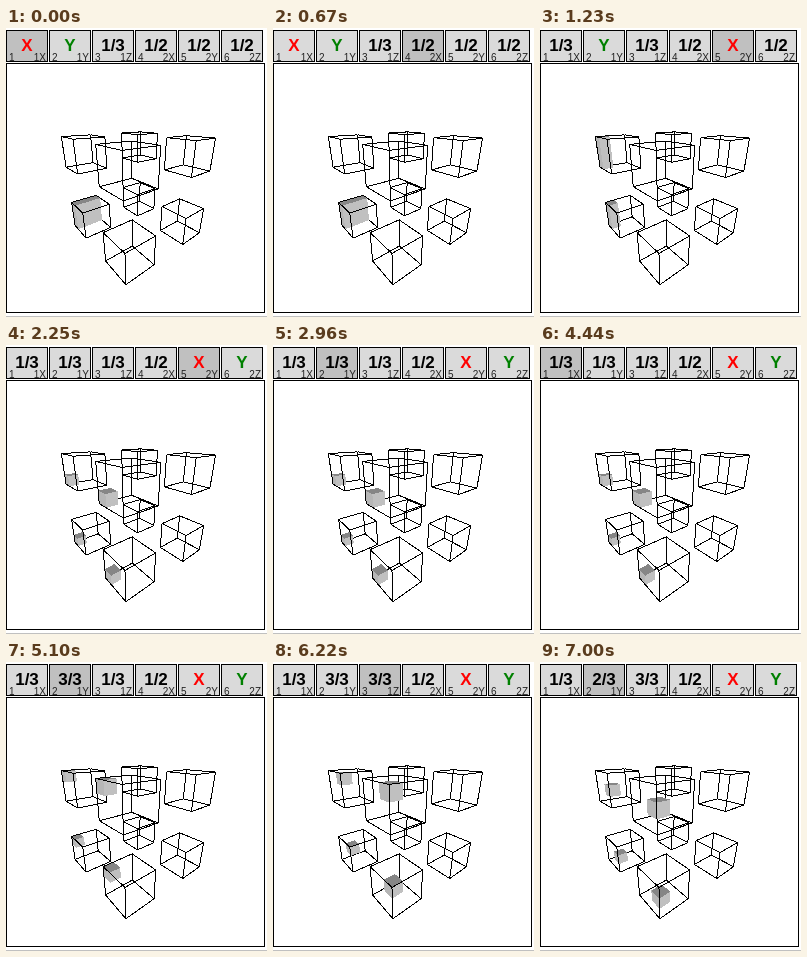
An HTML page for the animation above (7140 ms loop, 261 px wide and 289 px high).

```html
<!DOCTYPE html>
<html lang="en">
<head>
<meta charset="utf-8">
<title>Six-axis cube selector</title>
<style>
  html, body { margin: 0; width: 100%; height: 100%; overflow: hidden; background: #fff; }
  svg { display: block; position: absolute; left: 0; top: 0; }
  text { font-family: Arial, "Liberation Sans", sans-serif; }
  .cell rect { fill: #dadada; stroke: #000; }
  .cell.on rect { fill: #c0c0c0; }
  .value { font-size: 17px; font-weight: bold; text-anchor: middle; }
  .small { font-size: 10px; fill: #222; }
  .end { text-anchor: end; }
  .crisp { shape-rendering: crispEdges; }
  .wire { fill: none; stroke: #000; stroke-width: 1; }
</style>
</head>
<body>
<svg id="stage" width="261" height="289" viewBox="0 0 261 289">
  <rect class="crisp wire" x="0.5" y="35.5" width="258" height="249"/>
  <rect class="crisp" y="288" width="261" height="1" fill="#c0c0c0"/>
  <g id="cells"></g>
  <g id="scene" class="crisp"></g>
</svg>
<script>
const LOOP = 7140;
const LABELS = ['1X', '1Y', '1Z', '2X', '2Y', '2Z'];
const SIZES = [3, 3, 3, 2, 2, 2];
const START = ['X', 'Y', 1, 1, 1, 1];
const INK = { X: '#f00', Y: '#008000' };

// Each step: time, then either a cell to select or axis values to set
const STEPS = [
  [110, 1], [390, 2], [670, 3], [950, 4],
  [1230, { 0: 1, 4: 'X' }],
  [1510, 5],
  [1920, { 1: 1, 5: 'Y' }],
  [2250, 4], [2490, 3], [2680, 2], [2960, 1], [3180, 0],
  [3510, { 0: 2 }], [3790, { 0: 3 }], [4120, { 0: 2 }], [4440, { 0: 1 }],
  [4630, 1],
  [4820, { 1: 2 }], [5100, { 1: 3 }],
  [5750, 2],
  [5930, { 2: 2 }], [6220, { 2: 3 }],
  [6680, 1],
  [7000, { 1: 2 }]
];

const NS = 'http://www.w3.org/2000/svg';
const byId = id => document.getElementById(id);

function add(parent, tag, attrs, text = '') {
  const el = document.createElementNS(NS, tag);
  for (const key in attrs) el.setAttribute(key, attrs[key]);
  el.textContent = text;
  parent.appendChild(el);
  return el;
}

// Perspective camera aimed at the middle of the eight cubes
const YAW = 39.3 * Math.PI / 180, PITCH = 22 * Math.PI / 180;
const DIST = 5, FOCAL = 171, CX = 129.2, CY = 160;
const HALF = 0.428;

function toCamera([x, y, z]) {
  const w = z * Math.cos(YAW) - x * Math.sin(YAW);
  return {
    u: x * Math.cos(YAW) + z * Math.sin(YAW),
    up: y * Math.cos(PITCH) - w * Math.sin(PITCH),
    near: w * Math.cos(PITCH) + y * Math.sin(PITCH)
  };
}

function project(point) {
  const { u, up, near } = toCamera(point);
  const k = FOCAL / (DIST - near);
  return (CX + u * k).toFixed(2) + ' ' + (CY - up * k).toFixed(2);
}

// Corner bits: 1 = x, 2 = y, 4 = z
function corners(lo, hi) {
  return Array.from({ length: 8 }, (_, i) =>
    project([0, 1, 2].map(a => (i >> a & 1 ? hi : lo)[a])));
}

const center = cube => cube.map(bit => 2 * bit - 1);
const depth = cube => toCamera(center(cube)).near;

// Far cubes come first, so nearer ones paint over them
const cubes = Array.from({ length: 8 }, (_, i) => [0, 1, 2].map(a => i >> a & 1))
  .sort((a, b) => depth(a) - depth(b));

function bounds(cube, ranges) {
  const at = side => center(cube).map((c, a) =>
    c + HALF * (2 * ranges[a][side] / 3 - 1));
  return corners(at(0), at(1));
}

const BACK = 1; // the corner farthest from the camera
const FACES = [
  [[0, 2, 6, 4], '#b6b6b6'],
  [[4, 5, 7, 6], '#c0c0c0'],
  [[2, 3, 7, 6], '#868686']
];

function addEdges(parent, p, behind) {
  let d = '';
  for (let i = 0; i < 8; i++)
    for (const bit of [1, 2, 4]) {
      const j = i | bit;
      if (j !== i && (i === BACK || j === BACK) === behind) d += `M${p[i]}L${p[j]}`;
    }
  add(parent, 'path', { class: 'wire', d });
}

const free = v => typeof v === 'string';

function drawScene(values) {
  const scene = byId('scene');
  scene.textContent = '';
  const full = [[0, 3], [0, 3], [0, 3]];
  const ranges = values.slice(0, 3).map(v => free(v) ? [0, 3] : [v - 1, v]);
  for (const cube of cubes) {
    const frame = bounds(cube, full);
    addEdges(scene, frame, true);
    if (cube.every((bit, a) => free(values[a + 3]) || values[a + 3] === bit + 1)) {
      const p = bounds(cube, ranges);
      for (const [ids, fill] of FACES)
        add(scene, 'path', { d: 'M' + ids.map(i => p[i]).join('L') + 'Z', fill });
    }
    addEdges(scene, frame, false);
  }
}

const cells = LABELS.map((label, i) => {
  const g = add(byId('cells'), 'g', { transform: `translate(${43 * i} 0)` });
  add(g, 'rect', { class: 'crisp', x: 0.5, y: 2.5, width: 41, height: 31 });
  const value = add(g, 'text', { class: 'value', x: 21, y: 23 });
  add(g, 'text', { class: 'small', x: 3, y: 33 }, i + 1);
  add(g, 'text', { class: 'small end', x: 40, y: 33 }, label);
  return { g, value };
});

function render(count) {
  const values = START.slice();
  let picked = 0;
  for (const [, change] of STEPS.slice(0, count)) {
    if (typeof change === 'number') picked = change;
    else Object.assign(values, change);
  }
  cells.forEach(({ g, value }, i) => {
    const v = values[i];
    g.setAttribute('class', i === picked ? 'cell on' : 'cell');
    value.textContent = free(v) ? v : `${v}/${SIZES[i]}`;
    value.setAttribute('fill', INK[v] || '#000');
  });
  drawScene(values);
}

let shown = -1;
const begin = performance.now();

function tick() {
  const t = (performance.now() - begin) % LOOP;
  const count = STEPS.filter(([at]) => at <= t).length;
  if (count !== shown) render(shown = count);
  requestAnimationFrame(tick);
}
tick();
</script>
</body>
</html>
```
